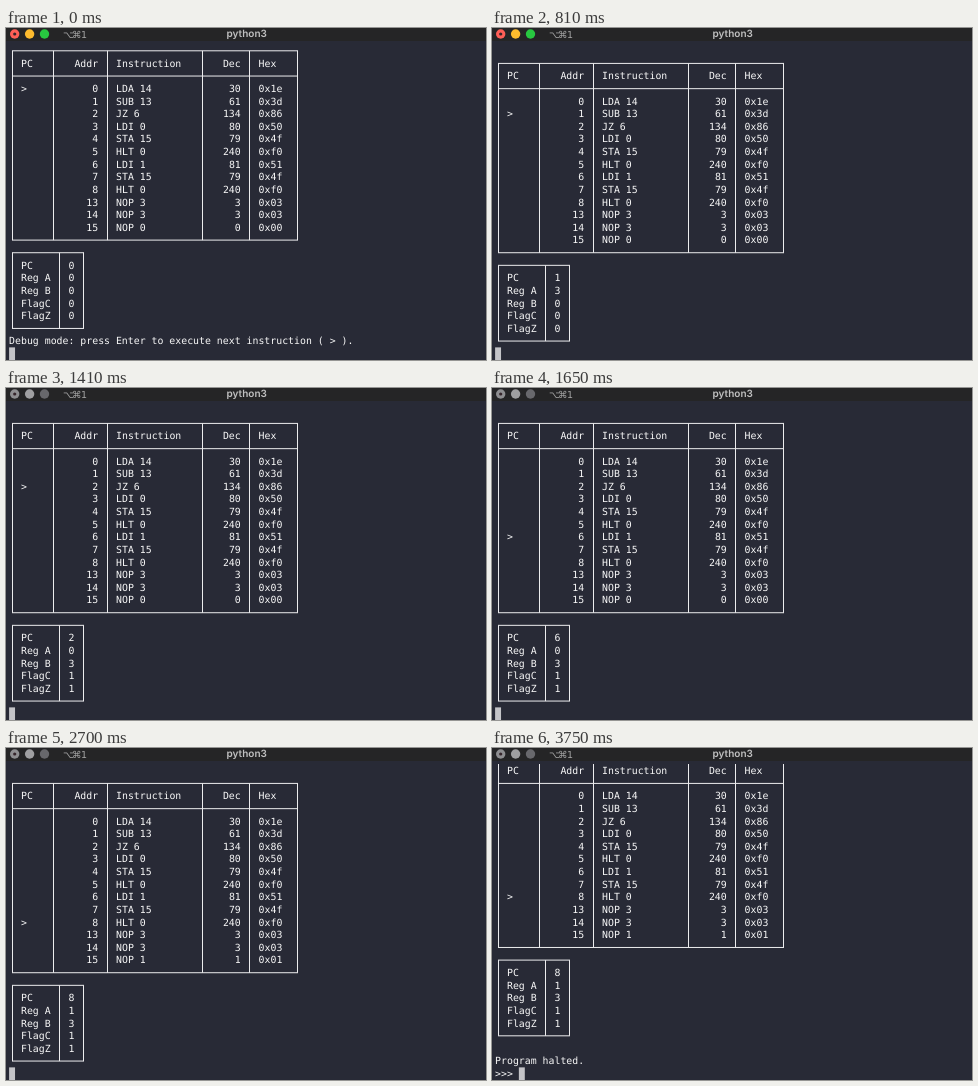
An HTML page that plays this animation: 480 px wide and 332 px high, repeating every 4.05 s.

```html
<!DOCTYPE html>
<html lang="en">
<head>
<meta charset="utf-8">
<title>python3</title>
<style>
  html, body { margin: 0; width: 100%; height: 100%; overflow: hidden; background: #282a36; }
  svg { display: block; width: 480px; height: 332px; }
  text { white-space: pre; text-rendering: geometricPrecision; }
  #screen { font: 9.867px "DejaVu Sans Mono", monospace; fill: #f8f8f8; }
  #screen path { fill: none; stroke: #ececee; stroke-width: 1; }
  #screen .cursor { fill: #c4c4c8; }
  .title { font: 600 10px Inter, sans-serif; fill: #c0c0c0; text-anchor: middle; }
  .keys { font: 9.5px "DejaVu Sans", sans-serif; fill: #a4a4a4; }
  .dot { animation: blur 4050ms step-end infinite; }
  .close { --off: #8e8e90; }
  .hide { --off: #a0a0a2; }
  .zoom { --off: #68686c; }
  @keyframes blur { 25.926% { fill: var(--off); } }
</style>
</head>
<body>
<svg viewBox="0 0 480 332">
  <defs><clipPath id="view"><path d="M0 16H480V332H0Z"/></clipPath></defs>
  <rect width="480" height="332" fill="#282a36"/>
  <rect width="480" height="13" fill="#252526"/>
  <circle class="dot close" cx="8.7" cy="6" r="4.7" fill="#ff5f57"/>
  <circle cx="8.7" cy="6" r="1.6" fill="#35252a"/>
  <circle class="dot hide" cx="23.6" cy="6" r="4.7" fill="#febc2e"/>
  <circle class="dot zoom" cx="38.5" cy="6" r="4.7" fill="#28c840"/>
  <text class="keys" x="57 66 75" y="9.8">⌥⌘1</text>
  <text class="title" x="240.7" y="9.4">python3</text>
  <g id="screen" clip-path="url(#view)"></g>
</svg>
<script>
const LOOP = 4050, CELL = 5.94, LINE = 12.62;
const OPCODES = { NOP: 0, LDA: 1, SUB: 3, STA: 4, LDI: 5, JZ: 8, HLT: 15 };
const PROGRAM = [
  [0, 'LDA', 14], [1, 'SUB', 13], [2, 'JZ', 6], [3, 'LDI', 0],
  [4, 'STA', 15], [5, 'HLT', 0], [6, 'LDI', 1], [7, 'STA', 15],
  [8, 'HLT', 0], [13, 'NOP', 3], [14, 'NOP', 3], [15, 'NOP', 0]
];
const REGISTERS = ['PC', 'Reg A', 'Reg B', 'FlagC', 'FlagZ'];

// top: terminal row of the table; regs follow REGISTERS; result: cell 15
const STEPS = [
  { at: 0, top: 0, regs: [0, 0, 0, 0, 0], result: 0,
    message: 'Debug mode: press Enter to execute next instruction ( > ).' },
  { at: 450, top: 1, regs: [1, 3, 0, 0, 0], result: 0 },
  { at: 1050, top: 1, regs: [2, 0, 3, 1, 1], result: 0 },
  { at: 1650, top: 1, regs: [6, 0, 3, 1, 1], result: 0 },
  { at: 2250, top: 1, regs: [7, 1, 3, 1, 1], result: 0 },
  { at: 2700, top: 1, regs: [8, 1, 3, 1, 1], result: 1 },
  { at: 3300, top: -1, regs: [8, 1, 3, 1, 1], result: 1,
    message: 'Program halted.', prompt: '>>> ' }
];

const colX = col => 3.1 + col * CELL;
const rowY = row => 22.8 + row * LINE;
const snap = v => Math.floor(v) + 0.5;

const escapeText = s => s.replace(/&/g, '&amp;').replace(/</g, '&lt;').replace(/>/g, '&gt;');

function put(col, row, value, width = 0) {
  const s = String(value).padStart(width);
  const start = s.search(/\S/);
  return `<text x="${colX(col + start).toFixed(2)}" y="${(rowY(row) + 3.3).toFixed(2)}">${escapeText(s.trim())}</text>`;
}

function grid(cols, rows) {
  const xs = cols.map(c => snap(colX(c + 0.5)));
  const ys = rows.map(rowY);
  const [left, right, top, bottom] = [xs[0], xs.at(-1), ys[0], ys.at(-1)];
  const d = ys.map(y => `M${left - 0.5} ${y}H${right + 0.5}`).join('') +
            xs.map(x => `M${x} ${top}V${bottom}`).join('');
  return `<path d="${d}"/>`;
}

function listing({ top, regs, result }) {
  let out = grid([0, 7, 16, 32, 40, 48], [top, top + 2, top + 15]);
  out += put(2, top + 1, 'PC') + put(11, top + 1, 'Addr') + put(18, top + 1, 'Instruction') +
         put(36, top + 1, 'Dec') + put(42, top + 1, 'Hex');
  PROGRAM.forEach(([addr, op, operand], i) => {
    const row = top + 3 + i;
    const arg = addr === 15 ? result : operand;
    const value = OPCODES[op] * 16 + arg;
    if (addr === regs[0]) out += put(2, row, '>');
    out += put(11, row, addr, 4) + put(18, row, `${op} ${arg}`) + put(36, row, value, 3) +
           put(42, row, '0x' + value.toString(16).padStart(2, '0'));
  });
  return out;
}

function registers({ top, regs }) {
  const first = top + 16;
  return grid([0, 8, 12], [first, first + 6]) +
    REGISTERS.map((name, i) => put(2, first + 1 + i, name) + put(10, first + 1 + i, regs[i])).join('');
}

function render(step) {
  const { message, prompt = '' } = step;
  let out = listing(step) + registers(step);
  if (message) out += put(0, 23, message);
  if (prompt) out += put(0, 24, prompt.trim());
  out += `<rect class="cursor" x="${colX(prompt.length)}" y="${rowY(24) - 6.3}" width="${CELL}" height="${LINE}"/>`;
  return out;
}

const screen = document.getElementById('screen');
const dots = document.getAnimations();
let shown;

function tick() {
  const now = performance.now();
  const t = now % LOOP;
  const step = STEPS.findLast(s => t >= s.at);
  dots.forEach(a => { a.currentTime = now; });
  if (step !== shown) {
    screen.innerHTML = render(step);
    shown = step;
  }
  requestAnimationFrame(tick);
}
tick();
</script>
</body>
</html>
```
